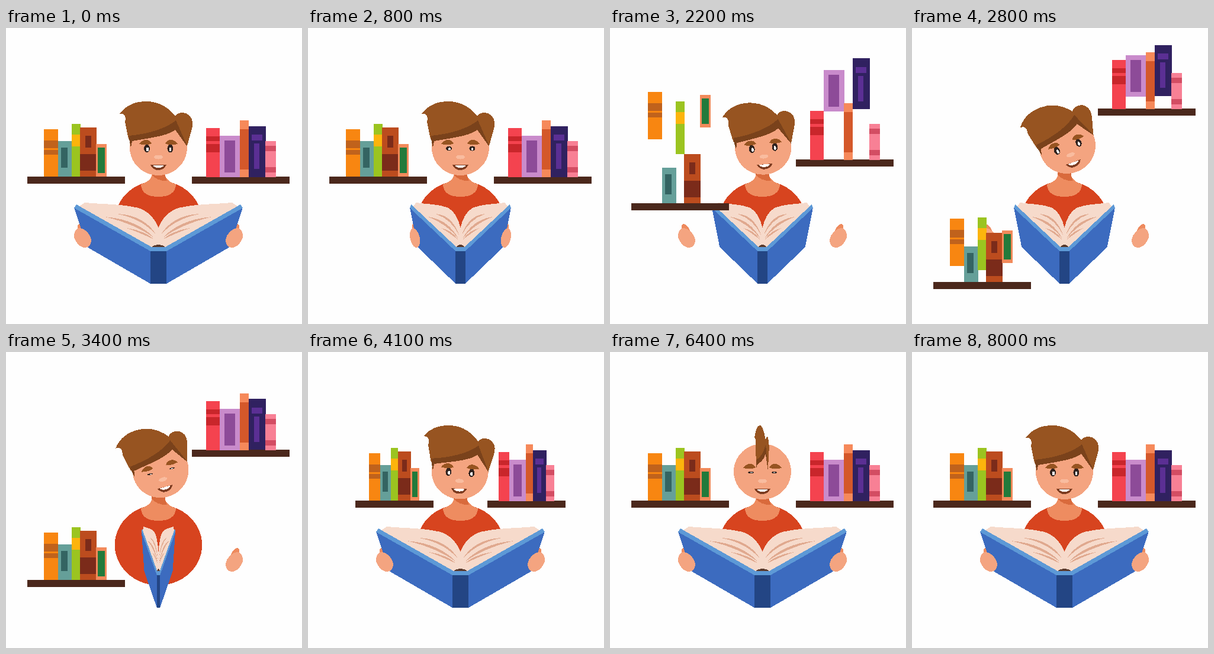
Animation of 500 by 500 pixels, one loop 9 s. Source, as an HTML page:

```html
<!DOCTYPE html>
<html lang="en">
<head>
<meta charset="utf-8">
<title>Reading</title>
<style>
html, body { margin: 0; width: 100%; height: 100%; overflow: hidden; background: #fefefe; }
svg { display: block; width: 100vw; height: 100vh; }
</style>
</head>
<body>
<svg viewBox="0 0 500 500" shape-rendering="crispEdges">
  <defs>
    <path id="thumb" fill="#ee8a5d" d="M121 345V336Q121 331 125 331Q131 332 136 344Z"/>
    <path id="palm" fill="#f4a480" d="M115 351Q115 343 120 339Q126 336 134 342Q144 350 144 360Q143 370 134 371Q126 371 120 363Q115 357 115 351Z"/>
    <g id="half">
      <path fill="#3c6bbf" d="M115 303L137 370L244 432H258V374H244Z"/>
      <path fill="#5d99d6" d="M119 298L115 304L244 377H258V370H246Z"/>
      <path fill="#5a3a2c" d="M246 370L252 366H258V370Z"/>
      <path fill="#f6dacb" d="M124 301L133 295C165 298 195 297 222 303.500C241 309 252 323 258 338.500V366Q251 366 246 370Z"/>
      <g fill="#e0a98f">
        <path d="M188 314C222 315 243 331 254 350C239 333 221 321 188 314Z"/>
        <path d="M167 319C208 322 234 337 251 355C230 340 205 328 167 319Z"/>
        <path d="M204 338C226 341 240 348 250 357C236 351 222 344 204 338Z"/>
      </g>
    </g>
    <path id="brow" fill="#975421" d="M225 196C229 188 242 186 246 195C239 199 232 197 225 196Z"/>
  </defs>

  <ellipse cx="257.5" cy="326" rx="73.8" ry="68" fill="#d7441f"/>
  <path fill="#ee8c60" d="M246 244H269V250Q272 259 287 264Q286 285 257.500 285Q229 285 228 264Q243 259 246 250Z"/>
  <path fill="#d96a3c" d="M246 244H269V250L272 258Q256 259 246 248Z"/>

  <g id="grip">
    <use href="#thumb"/>
    <use href="#thumb" transform="translate(515) scale(-1 1)"/>
    <g id="book">
      <use href="#half"/>
      <use href="#half" transform="translate(515) scale(-1 1)"/>
      <path fill="#234584" d="M244 377H271V432H244Z"/>
    </g>
    <use href="#palm"/>
    <use href="#palm" transform="translate(515) scale(-1 1)"/>
  </g>

  <g id="head">
    <ellipse cx="257.5" cy="202" rx="48.5" ry="47" fill="#f4a480"/>
    <use href="#brow"/>
    <use href="#brow" transform="translate(515) scale(-1 1)"/>
    <g id="eyes">
      <ellipse cx="238" cy="203.5" rx="5" ry="6.7" fill="#30221e"/>
      <ellipse cx="277.500" cy="203.5" rx="5" ry="6.7" fill="#30221e"/>
      <ellipse cx="239" cy="205" rx="2" ry="3.5" fill="#fff"/>
      <ellipse cx="277.500" cy="205" rx="2" ry="3.5" fill="#fff"/>
    </g>
    <ellipse cx="257.5" cy="218" rx="7.5" ry="3.500" fill="#f9bc9f"/>
    <path fill="#7d3c21" d="M244 231Q257 232 271 231Q267 240 257 240Q248 240 244 231Z"/>
    <path fill="#fff" d="M248 231.500H267Q265 236 257.500 236Q250 236 248 231.500Z"/>
    <g id="hair">
      <path fill="#7a421b" d="M286 154L308 190L306 200L286 172C272 183 240 186 213 191L211 202L206 178Z"/>
      <path fill="#975421" d="M192 145C204 129 220 124 237 124C260 124 276 136 286 149C290 142 302 141 309 147C317 154 316 164 313 174L306 199L287 156C270 170 240 179 208 182V190L206 183L201 159Q203 151 200 147Q197 144 192 145Z"/>
    </g>
  </g>

  <g id="shelves"></g>
</svg>
<script>
const $ = id => document.getElementById(id);
const CX = 257.5;

// Each part: x, y, width, height, colour; rise is how high the book jumps.
const jumpers = [];
function add(parent, rise, ...parts) {
  const g = document.createElementNS('http://www.w3.org/2000/svg', 'g');
  g.innerHTML = parts.map(([x, y, w, h, c]) =>
    `<rect x="${x}" y="${y}" width="${w}" height="${h}" fill="${c}"/>`).join('');
  parent.append(g);
  if (rise) jumpers.push([g, rise]);
  return g;
}

const left = add($('shelves'), 0, [36, 251, 165, 12, '#4b281c']);
add(left, 135, [64, 171, 24, 80, '#f88611'], [64, 190, 24, 13, '#c0621c'], [64, 206, 24, 8, '#c0621c']);
add(left, 0, [88, 191, 24, 60, '#659f99'], [93, 202, 11, 34, '#346462']);
add(left, 103, [111, 162, 15, 89, '#9bc420'], [111, 180, 15, 20, '#fcb40c']);
add(left, 0, [125, 168, 28, 83, '#bc4c1e'], [134, 182, 10, 20, '#7b2b1a'], [125, 213, 28, 28, '#7b2b1a']);
add(left, 160, [152, 196, 18, 55, '#f28a5b'], [155, 202, 12, 43, '#227a3b']);

const right = add($('shelves'), 0, [314, 251, 165, 12, '#4b281c']);
add(right, 0, [338, 169, 23, 83, '#f4434f'], [338, 183, 23, 8, '#c9262b'], [338, 196, 23, 14, '#c9262b']);
add(right, 103, [361, 182, 35, 70, '#c98bcb'], [369, 190, 18, 54, '#8d4b98']);
add(right, 0, [395, 156, 15, 96, '#f6895a'], [395, 171, 15, 68, '#d4582a']);
add(right, 107, [410, 165.6, 29, 86, '#302160'], [415, 180, 18, 10, '#5b2f94'], [419, 195, 9, 43, '#5b2f94']);
add(right, 0, [438, 191, 18, 61, '#f88095'], [438, 199, 18, 9, '#d34d63'], [438, 235, 18, 9, '#d34d63']);

const set = (el, value) => el.setAttribute('transform', value);
const flip = (el, k, cx = CX) => set(el, `translate(${cx}) scale(${1 - 2 * k} 1) translate(${-cx})`);
const shift = (el, y) => set(el, `translate(0 ${y})`);

// Blends the identity matrix with a rotation, so the shape shrinks a little midway.
function tilt(el, deg, k, x, y) {
  const a = deg * Math.PI / 180;
  const c = 1 - k + k * Math.cos(a), s = k * Math.sin(a);
  set(el, `translate(${x} ${y}) matrix(${c} ${s} ${-s} ${c} 0 0) translate(${-x} ${-y})`);
}

function draw(now) {
  const s = Math.min(80, Math.floor(now % 9000 / 100)) / 10;
  // Linear rise to 1 at second c, then back to 0
  const peak = c => Math.max(0, 1 - Math.abs(s - c));

  flip($('grip'), peak(1));
  flip($('book'), peak(3));
  flip($('shelves'), peak(5));
  flip($('hair'), peak(7), 257);
  for (const [g, rise] of jumpers) shift(g, -rise * peak(2));
  shift(left, 223 * peak(3));
  shift(right, -144 * peak(3));
  if (s < 4) tilt($('head'), -25, peak(3), 253.5, 186.5);
  else tilt($('head'), 30, peak(5), 253.5, 186.5);

  const sec = Math.floor(s);
  const open = sec === 2 || sec === 4 ? 1 : Math.abs(1 - 2 * (s - sec));
  set($('eyes'), `translate(0 203.5) scale(1 ${open}) translate(0 -203.5)`);
}

const start = performance.now();
(function tick() {
  draw(performance.now() - start);
  requestAnimationFrame(tick);
})();
</script>
</body>
</html>
```
